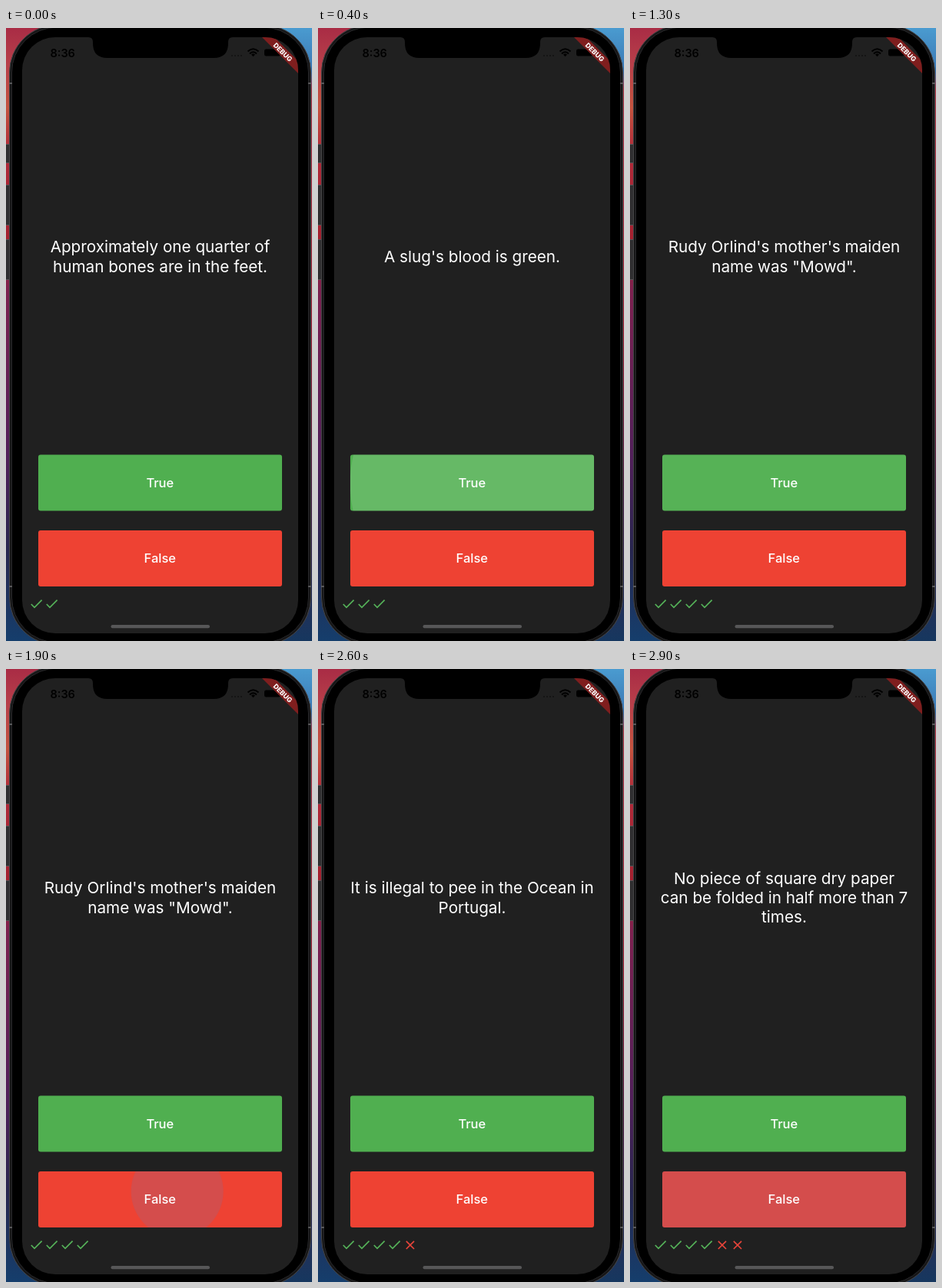
These frames come from a looping animation (398x798 px, 3000 ms). An HTML page:

```html
<!DOCTYPE html>
<html lang="en">
<head>
<meta charset="utf-8">
<title>True or false quiz</title>
<style>
html, body { margin: 0; width: 100%; height: 100%; overflow: hidden; background: #000; }
svg { display: block; width: 398px; height: 798px; }
text { font-family: Inter, "Open Sans", sans-serif; fill: #fff; text-anchor: middle; }
#question { font-size: 20.7px; }
.label { font-size: 16.5px; font-weight: 500; }
#marks path { fill: none; stroke-width: 1.7; }
</style>
</head>
<body>
<svg viewBox="0 0 398 798">
  <defs>
    <linearGradient id="left" x2="0" y2="1">
      <stop offset="0" stop-color="#a92c45"/>
      <stop offset=".06" stop-color="#b8404a"/>
      <stop offset=".13" stop-color="#c4533f"/>
      <stop offset=".2" stop-color="#b02b3a"/>
      <stop offset=".35" stop-color="#a3202f"/>
      <stop offset=".43" stop-color="#7c2150"/>
      <stop offset=".7" stop-color="#51205a"/>
      <stop offset=".85" stop-color="#28264f"/>
      <stop offset="1" stop-color="#153e6c"/>
    </linearGradient>
    <linearGradient id="right" x2="0" y2="1">
      <stop offset="0" stop-color="#4a9bd0"/>
      <stop offset=".07" stop-color="#3c78b4"/>
      <stop offset=".1" stop-color="#b63a4c"/>
      <stop offset=".5" stop-color="#a82338"/>
      <stop offset=".75" stop-color="#4c1d45"/>
      <stop offset="1" stop-color="#16375f"/>
    </linearGradient>
    <clipPath id="screen"><rect x="21" y="12" width="359" height="776" rx="43"/></clipPath>
    <clipPath id="clipTrue"><rect x="42" y="555.5" width="317" height="73" rx="3"/></clipPath>
    <clipPath id="clipFalse"><rect x="42" y="654" width="317" height="73" rx="3"/></clipPath>
  </defs>

  <rect width="200" height="798" fill="url(#left)"/>
  <rect x="200" width="198" height="798" fill="url(#right)"/>
  <g fill="#2f2e30" stroke="#565456" stroke-width="1">
    <rect x="-4" y="151.5" width="9" height="24"/>
    <rect x="-4" y="204.5" width="9" height="52"/>
    <rect x="-4" y="275.5" width="9" height="52"/>
  </g>
  <rect x="4.5" y="-4" width="392" height="807" rx="62" fill="#161617" stroke="#454547"/>
  <rect x="7.5" y="-1" width="386" height="801" rx="59" fill="#000" stroke="#29292b"/>
  <path d="M4 72h4M393 72h4M4 727h4M393 727h4" stroke="#59595b" stroke-width="2"/>

  <g clip-path="url(#screen)">
    <rect x="21" y="12" width="359" height="776" fill="#202020"/>
    <path d="M107 12Q113 12 113 18V20Q113 39 132 39H270Q289 39 289 20V18Q289 12 295 12Z"/>
    <text x="73.7" y="37.8" font-size="14.5" font-weight="600" style="fill:#000">8:36</text>
    <path d="M293 36h2m2 0h2m2 0h2m2 0h2" stroke="#151515" stroke-width="2"/>
    <g fill="none" stroke="#000" stroke-width="2">
      <path d="M314.5 30.5Q321.5 24 328.5 30.5M317 33.4Q321.5 29.2 326 33.4"/>
      <path d="M319 34.5Q321.5 32.5 324 34.5L321.5 37.2Z" fill="#000" stroke="none"/>
    </g>
    <rect x="336" y="27.5" width="21" height="9" rx="2.5"/>
    <path d="M333 12H349L381 44V60Z" fill="#7f1e1e"/>
    <text transform="translate(360.2 31.4) rotate(45)" y="3.3" font-size="8.8" font-weight="800">DEBUG</text>
    <rect x="136.5" y="777" width="128.5" height="4.3" rx="2.1" fill="#575758"/>
  </g>

  <g id="question"></g>
  <g clip-path="url(#clipTrue)">
    <rect x="42" y="555" width="317" height="74" fill="#50af50"/>
    <circle id="rippleTrue" fill="#fff"/>
  </g>
  <g clip-path="url(#clipFalse)">
    <rect x="42" y="653" width="317" height="75" fill="#ee4233"/>
    <circle id="rippleFalse" fill="#2196f3"/>
  </g>
  <text class="label" x="200.3" y="598">True</text>
  <text class="label" x="200.3" y="696.2">False</text>
  <g id="marks"></g>
</svg>
<script>
const LOOP = 3000, STEP = 100;
const questions = [
  ["Approximately one quarter of", "human bones are in the feet."],
  ["A slug's blood is green."],
  ["Rudy Orlind's mother's maiden", "name was \"Mowd\"."],
  ["It is illegal to pee in the Ocean in", "Portugal."],
  ["No piece of square dry paper", "can be folded in half more than 7", "times."]
];
// Each tap: press and release times, touch point, answer, and whether it was right.
const taps = [
  { down: 165, up: 265, x: 230, y: 607, answer: "True", right: true },
  { down: 825, up: 963, x: 230, y: 607, answer: "True", right: true },
  { down: 1800, up: 1965, x: 225, y: 679, answer: "False", right: false },
  { down: 2610, up: 2690, x: 225, y: 679, answer: "False", right: false }
];
const centerY = { True: 592, False: 690.5 };
const RADIUS = 162.6;
const $ = id => document.getElementById(id);
const clamp = v => Math.max(0, Math.min(1, v));
const mix = (a, b, k) => a + (b - a) * k;

// cubic-bezier(.25, .1, .25, 1)
function ease(x) {
  if (x <= 0 || x >= 1) return clamp(x);
  let lo = 0, hi = 1, s;
  const bez = (a, b) => 3 * a * s * (1 - s) ** 2 + 3 * b * s * s * (1 - s) + s ** 3;
  for (let i = 0; i < 24; i++) {
    s = (lo + hi) / 2;
    if (bez(.25, .25) < x) lo = s; else hi = s;
  }
  return bez(.1, 1);
}

function ripple(tap, t) {
  const held = Math.min(t, tap.up) - tap.down;
  const released = Math.max(0, t - tap.up);
  const k = ease(clamp(held / 1000 + released / 225));
  const alpha = .125 * clamp((t - tap.down) / 75) * (1 - clamp((released - 225) / 150));
  const c = $("ripple" + tap.answer);
  c.setAttribute("cx", mix(tap.x, 200.5, k));
  c.setAttribute("cy", mix(tap.y, centerY[tap.answer], k));
  c.setAttribute("r", mix(RADIUS * .3, RADIUS + 5, k));
  c.setAttribute("opacity", alpha);
}

function mark(right, i) {
  const x = 32.8 + i * 20;
  return right
    ? `<path d="M${x} 750l4.2 4.3l9.6-9.6" stroke="#55b259"/>`
    : `<path d="M${x + 2} 744.8l10.2 10.2m0-10.2l-10.2 10.2" stroke="#e8443a"/>`;
}

let shown = -1;
function showQuestion(n) {
  if (n === shown) return;
  shown = n;
  const lines = questions[n];
  $("question").replaceChildren(...lines.map((line, i) => {
    const el = document.createElementNS("http://www.w3.org/2000/svg", "text");
    el.setAttribute("x", 200.5);
    el.setAttribute("y", 305 + (i - (lines.length - 1) / 2) * 25.2);
    el.textContent = line;
    return el;
  }));
  const results = [true, true, ...taps.slice(0, n).map(tap => tap.right)];
  $("marks").innerHTML = results.map(mark).join("");
}

function draw(now) {
  const t = Math.floor((now % LOOP) / STEP) * STEP;
  showQuestion(taps.filter(tap => t >= tap.up).length);
  for (const id of ["rippleTrue", "rippleFalse"]) $(id).setAttribute("opacity", 0);
  const active = taps.find(tap => t >= tap.down && t < tap.up + 375);
  if (active) ripple(active, t);
}

const start = performance.now();
function tick() {
  draw(performance.now() - start);
  requestAnimationFrame(tick);
}
tick();
</script>
</body>
</html>
```
